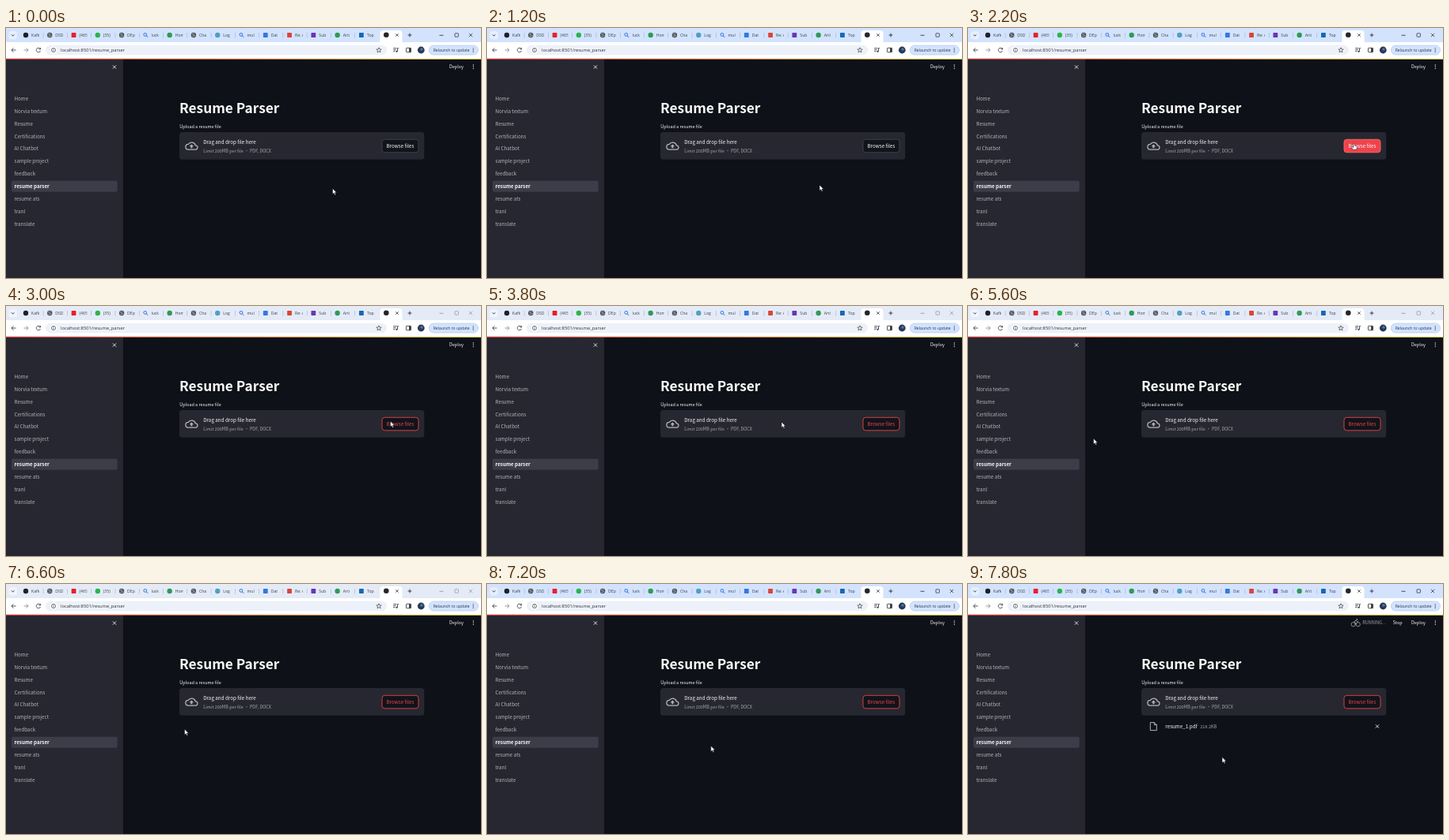
Write an HTML page with a canvas that moves like this. It is 600 px wide and 317 px high and loops after 8 s.

```html
<!DOCTYPE html>
<html lang="en">
<head>
<meta charset="utf-8">
<title>Resume Parser</title>
<style>
html, body { margin: 0; width: 100%; height: 100%; overflow: hidden; background: #0e1117; }
canvas { display: block; width: 600px; height: 317px; }
</style>
</head>
<body>
<canvas id="stage"></canvas>
<script>
const W = 600, H = 317, LOOP = 8000, STEP = 200;
const canvas = document.getElementById('stage');
const ratio = window.devicePixelRatio || 1;
canvas.width = W * ratio;
canvas.height = H * ratio;
const ctx = canvas.getContext('2d');

const PAGE = '"Noto Sans CJK SC", "Noto Sans CJK JP", "Noto Sans CJK", "Noto Sans", sans-serif';
const CHROME = '"Open Sans", "Noto Sans", sans-serif';
const LARGE = 6.28, SMALL = 5.5;
const RED = '#ee4148';

// Drawing helpers
function rect(x, y, w, h, fill) {
  ctx.fillStyle = fill;
  ctx.fillRect(x, y, w, h);
}
function round(x, y, w, h, r, fill, stroke, lw = 0.8) {
  ctx.beginPath();
  ctx.roundRect(x, y, w, h, r);
  if (fill) { ctx.fillStyle = fill; ctx.fill(); }
  if (stroke) { ctx.strokeStyle = stroke; ctx.lineWidth = lw; ctx.stroke(); }
}
function circle(x, y, r, fill, stroke, lw = 0.8) {
  ctx.beginPath();
  ctx.arc(x, y, r, 0, Math.PI * 2);
  if (fill) { ctx.fillStyle = fill; ctx.fill(); }
  if (stroke) { ctx.strokeStyle = stroke; ctx.lineWidth = lw; ctx.stroke(); }
}
function path(d, x, y, scale, { fill, stroke, lw = 1 }) {
  const shape = new Path2D(d);
  ctx.save();
  ctx.translate(x, y);
  ctx.scale(scale, scale);
  if (fill) { ctx.fillStyle = fill; ctx.fill(shape); }
  if (stroke) {
    ctx.strokeStyle = stroke;
    ctx.lineWidth = lw / scale;
    ctx.lineJoin = 'round';
    ctx.stroke(shape);
  }
  ctx.restore();
}
function text(str, x, y, size, color, family = PAGE, weight = 400) {
  ctx.font = `${weight} ${size}px ${family}`;
  ctx.fillStyle = color;
  ctx.fillText(str, x, y);
}
function cross(x, y, r, color, lw = 0.9) {
  path(`M${-r} ${-r}L${r} ${r}M${r} ${-r}L${-r} ${r}`, x, y, 1, { stroke: color, lw });
}
function dots(x, y, color) {
  for (const d of [-2.2, 0, 2.2]) circle(x, y + d, 0.65, color);
}

// Browser tabs
const icons = {
  globe(x, y) {
    circle(x, y, 3.2, '#4b5057');
    path('M-2 -1.4Q0 0 1 -2M-1.5 1.8Q.4 .4 2.2 1', x, y, 1, { stroke: '#d5dae0', lw: 0.8 });
  },
  search(x, y) {
    circle(x - 0.6, y - 0.6, 1.9, null, '#1a68d6', 0.9);
    path('M.8 .8L2.8 2.8', x, y, 1, { stroke: '#1a68d6', lw: 1 });
  }
};
const dot = color => (x, y) => circle(x, y, 3.2, color);
const square = color => (x, y) => round(x - 2.9, y - 2.9, 5.8, 5.8, 0.6, color);
const tabs = [
  [dot('#1d2126'), 'Kafk'], [icons.globe, 'DSD'], [square('#e8202a'), '(465'],
  [dot('#2ab54a'), '(35)'], [icons.globe, 'DEp'], [icons.search, 'luck'],
  [dot('#2f9a55'), 'Hom'], [icons.globe, 'Cha'], [dot('#4f9fc4'), 'Log'],
  [icons.search, 'mul'], [square('#3478e0'), 'Dat'], [square('#db4437'), 'Re: A'],
  [square('#6a35b5'), 'Sub'], [dot('#2f9a55'), 'Arti'], [square('#1768b3'), 'Top']
];

function drawTabs(focused) {
  rect(0, 0, W, 19, focused ? '#d3e3fd' : '#e4ebf7');
  round(3.5, 4, 10.5, 10.5, 3.5, focused ? '#e6effd' : '#f0f4fb');
  path('M-1.8 -.9L0 .9L1.8 -.9', 8.7, 9.2, 1, { stroke: '#22262b', lw: 0.9 });
  tabs.forEach(([icon, label], i) => {
    const x = 25 + i * 30.28;
    icon(x, 9);
    ctx.save();
    ctx.beginPath();
    ctx.rect(x + 6, 2, 11, 14);
    ctx.clip();
    text(label, x + 7, 11, 5.1, '#3a4049', CHROME);
    ctx.restore();
    if (i < tabs.length - 1) rect(x + 21.8, 6, 0.6, 6.5, '#9fb2d0');
  });
  round(472.5, 3, 28, 18, [4, 4, 0, 0], '#fff');
  circle(480.3, 8.8, 3.3, '#23262b');
  cross(494, 9, 1.7, '#30343a', 0.8);
  const ink = focused ? '#202328' : '#8d939c';
  path('M-2.4 0H2.4M0 -2.4V2.4', 510, 9, 1, { stroke: '#2c3036', lw: 0.9 });
  rect(547.5, 8.8, 5, 0.8, ink);
  round(567, 6.8, 4.4, 4.4, 0.5, null, ink, 0.7);
  cross(587, 9, 2.2, ink, 0.7);
}

function drawToolbar() {
  rect(0, 18, W, 21, '#fff');
  const ink = { stroke: '#3c4147', lw: 0.9 };
  path('M3 0H-2.6M0 -2.6L-2.6 0L0 2.6', 9.5, 28, 1, ink);
  path('M-3 0H2.6M0 -2.6L2.6 0L0 2.6', 25.5, 28, 1, { stroke: '#8b9096', lw: 0.9 });
  path('M2.5 1A2.7 2.7 0 1 1 2 -1.8M2.6 -3V-1H.6', 41, 28, 1, ink);

  round(50, 21.8, 431, 12.4, 6.2, '#edf1f9');
  circle(60, 28, 4.6, '#fff');
  circle(60, 28, 2.6, null, '#3c4147', 0.7);
  rect(59.6, 27.5, 0.8, 2, '#3c4147');
  rect(59.6, 26.2, 0.8, 0.8, '#3c4147');
  text('localhost:8501/resume_parser', 69, 30, 5.75, '#2b2f35', CHROME);
  path('M0 -3.2L.9 -1L3.2 -.9L1.4 .6L2 2.8L0 1.6L-2 2.8L-1.4 .6L-3.2 -.9L-.9 -1Z', 471, 28, 1, { stroke: '#3c4147', lw: 0.7 });

  path('M-3.3 -2.3H1M-3.3 -.3H0M-3.3 1.7H-1M2 1.8V-2.4H3.6', 492.5, 28, 1, ink);
  circle(491.9 + 1.6, 29.8, 1.1, '#3c4147');
  round(505.5, 25.3, 6, 5.4, 0.7, null, '#3c4147', 0.9);
  rect(509, 25.3, 2.5, 5.4, '#3c4147');
  circle(524.3, 28, 4.4, '#26395a');
  circle(525, 27, 1.7, '#5d7696');

  round(534.3, 22, 62.2, 12, 6, '#d3e3fd', '#a9c4ee', 0.6);
  text('Relaunch to update', 539.7, 29.8, 5.06, '#24344f', CHROME);
  dots(590.2, 28, '#24344f');
}

// Page
const menu = ['Home', 'Norvia textum', 'Resume', 'Certifications', 'AI Chatbot', 'sample project',
  'feedback', 'resume parser', 'resume ats', 'tranl', 'translate'];
const ACTIVE = 7;

function drawSidebar() {
  rect(0, 39, 148, H - 39, '#262730');
  cross(137, 49.5, 2.1, '#f0f0f3');
  menu.forEach((label, i) => {
    const y = 92 + i * 15.85, on = i === ACTIVE;
    if (on) round(7, y - 9.3, 133.7, 14, 1.8, '#3c3d49');
    text(label, 10.5, y, LARGE, on ? '#fafafa' : '#b5b6bb', PAGE, on ? 700 : 400);
  });
}

const buttonLook = {
  idle: ['#11141b', '#41434b', '#fafafa'],
  lit: ['#11141b', RED, RED],
  down: ['#f0434b', '#ff6a6a', '#fff']
};

function drawUploader(mode) {
  text('Resume Parser', 219, 107.5, 17.3, '#fafafa', PAGE, 700);
  text('Upload a resume file', 219.2, 127.3, SMALL, '#fafafa');
  round(219, 132, 309.3, 34.8, 3.5, '#262730');
  path('M6 19h13a4 4 0 0 0 .3-8A7.4 7.4 0 0 0 6 9a5 5 0 0 0 0 10z', 226.2, 141.3, 0.68, { stroke: '#b4b5ba', lw: 1.3 });
  path('M8 13h2.55v3.2h2.9V13H16l-4-4z', 226.2, 141.3, 0.68, { fill: '#b4b5ba' });
  text('Drag and drop file here', 249.3, 147.3, LARGE, '#fafafa');
  text('Limit 200MB per file • PDF, DOCX', 249.3, 157.7, SMALL, '#a6a7ac');
  const [fill, edge, ink] = buttonLook[mode];
  round(475, 141.3, 46, 16.5, 3.4, fill, edge, 0.9);
  ctx.textAlign = 'center';
  text('Browse files', 498, 152, LARGE, ink);
  ctx.textAlign = 'left';
}

function drawFile() {
  path('M-4 -5H1L4 -2V5H-4ZM1 -5V-2H4', 234.3, 180.6, 1, { stroke: '#c4c5c9', lw: 0.9 });
  text('resume_1.pdf', 249.3, 182.6, LARGE, '#fafafa');
  text('218.2KB', 293.2, 182.6, SMALL, '#a6a7ac');
  cross(517, 180.5, 2.1, '#f0f0f3');
}

function drawRunning() {
  const gray = '#a3a5ab';
  circle(486.6, 51.2, 2.6, null, gray, 0.8);
  circle(492.8, 51.2, 2.6, null, gray, 0.8);
  path('M-.4 3.4L.2 1L-2 -.6L.6 -2.6L2 -.8H3.6', 489.6, 48.6, 1, { stroke: gray, lw: 0.9 });
  circle(491.3, 44.8, 0.9, gray);
  text('RUNNING...', 498.3, 51.2, SMALL, gray);
  text('Stop', 536.8, 51.2, SMALL, '#fafafa');
}

// Pointer: [time, x, y], resting between equal points
const track = [
  [0, 412.5, 203.5], [800, 412.5, 203.5], [1200, 420, 199], [1400, 420, 199],
  [2000, 487.5, 146.5], [2600, 487.5, 146.5], [3000, 485.5, 146], [3800, 372, 147],
  [4000, 352, 147], [4400, 289, 147.5], [4800, 226, 156], [5000, 226, 156],
  [5600, 158.5, 168], [6000, 200, 181], [6400, 200, 181], [6600, 225.5, 184],
  [7600, 321, 219.5], [8000, 321, 219.5]
];

function pointerAt(t) {
  const i = track.findIndex(p => p[0] > t);
  const [t0, x0, y0] = track[i - 1], [t1, x1, y1] = track[i];
  const k = (t - t0) / (t1 - t0);
  return [x0 + (x1 - x0) * k, y0 + (y1 - y0) * k];
}

function drawPointer(x, y, hand) {
  const shape = hand
    ? 'M-.8 0Q0 -.9 .8 0V2.6L3.5 3.3Q4.2 3.6 4 4.6L3.3 7.8H-1L-3.4 4.8Q-3 3.6 -1.7 4.4L-.8 5Z'
    : 'M0 0V7.2L1.7 5.7L2.9 8.3L4.1 7.7L3 5.2H5.2Z';
  path(shape, x, y, 1, { fill: '#fff', stroke: '#15171b', lw: 0.6 });
}

function buttonMode(t) {
  if (t < 1800) return 'idle';
  return t >= 2200 && t < 2400 ? 'down' : 'lit';
}

function draw(t) {
  ctx.setTransform(ratio, 0, 0, ratio, 0, 0);
  rect(0, 0, W, H, '#0e1117');
  drawTabs(t < 2600 || t >= 7200);
  drawToolbar();
  drawSidebar();
  const band = ctx.createLinearGradient(0, 0, W, 0);
  band.addColorStop(0, '#ff4b4b');
  band.addColorStop(1, '#fffd80');
  rect(0, 38.6, W, 1.1, band);
  text('Deploy', 560, 51.2, SMALL, '#fafafa');
  dots(590.3, 49.1, '#fafafa');
  drawUploader(buttonMode(t));
  if (t >= 7600) drawFile();
  if (t >= 7800) drawRunning();
  drawPointer(...pointerAt(t), t >= 1800 && t < 2800);
}

function tick(now) {
  const t = now % LOOP;
  draw(Math.floor(t / STEP) * STEP);
  requestAnimationFrame(tick);
}
draw(0);
requestAnimationFrame(tick);
</script>
</body>
</html>
```
